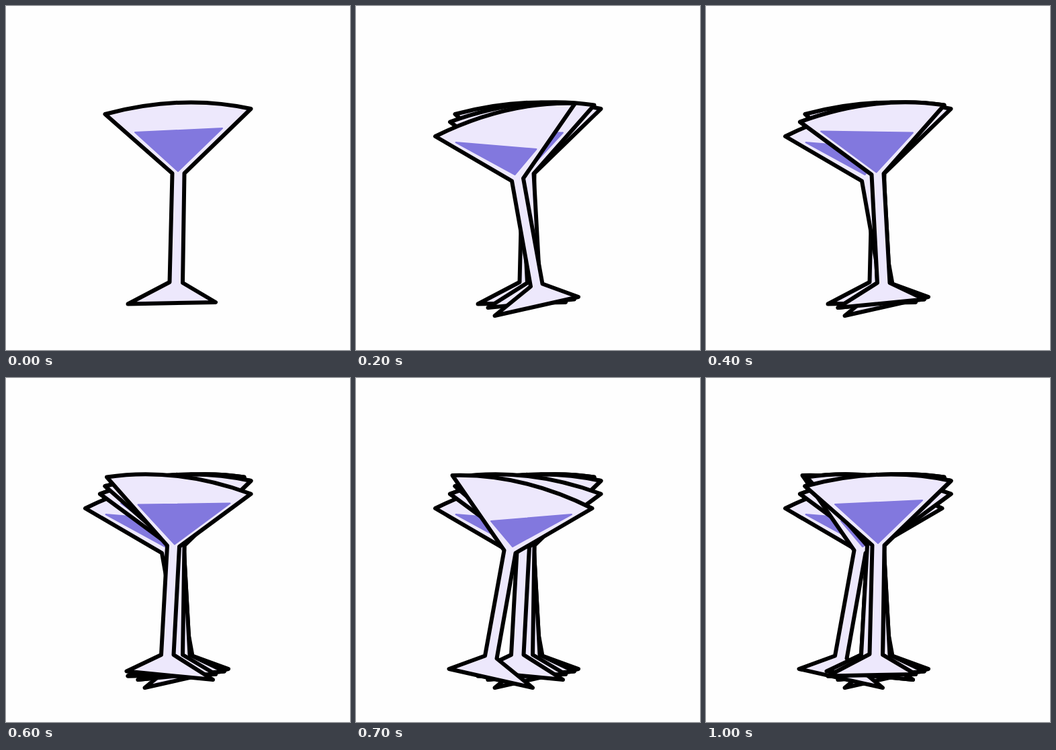
An HTML page for the animation above (1100 ms loop, 512x512 px).

```html
<!DOCTYPE html>
<html lang="en">
<head>
<meta charset="utf-8">
<title>Swaying glass</title>
<style>
  html, body { margin: 0; width: 100%; height: 100%; overflow: hidden; background: #fefefe; }
  svg { display: block; width: 100%; height: 100%; }
  .glass { fill: #ede8fc; stroke: #000; stroke-width: 6; stroke-linejoin: round; }
  .drink { fill: #8278de; stroke: #8278de; stroke-width: 2; stroke-linejoin: round; }
</style>
</head>
<body>
<svg id="stage" viewBox="0 0 512 512"></svg>
<script>
const LOOP = 1100;
const stage = document.getElementById('stage');

// Outline order: rim left, curve control, rim right, then clockwise to the left of the neck.
const upright = {
  glass: 'M147.5 161Q262 130.5 364.5 153L265.5 249L263 412L312 441L181.5 443.5L243.5 411L247.5 249Z',
  drink: 'M192 188L322 182L256 246Z'
};
const lean = {
  glass: 'M140 172.5Q251 132 354.5 147.5L264.5 249.5L273.5 412L325 436.5L196.5 449L255 412L246.5 251Z',
  drink: 'M171 186.5L308 188.5L253.5 247.5Z'
};
const tilt = {
  glass: 'M118 194Q223 142 326 145L249 256.5L277.5 413.5L331 433L206.5 461L260 417.5L232 260.5Z',
  drink: 'M148.5 203L268.5 213L236.5 251Z'
};
const mirror = (pose, sum) => ({ ...pose, flip: `matrix(-1 0 0 1 ${sum} 0)` });
const leanBack = mirror(lean, 504.5);
const tiltBack = mirror(tilt, 469.5);

// Each pose is stamped over the earlier ones and stays until the loop restarts.
const stamps = [
  [0, upright], [100, lean], [200, tilt], [400, lean], [500, upright],
  [600, leanBack], [700, tiltBack], [900, leanBack], [1000, upright]
];

function add(parent, tag, attrs) {
  const el = document.createElementNS('http://www.w3.org/2000/svg', tag);
  for (const key in attrs) el.setAttribute(key, attrs[key]);
  return parent.appendChild(el);
}

const layers = stamps.map(([start, pose]) => {
  const group = add(stage, 'g', pose.flip ? { transform: pose.flip } : {});
  add(group, 'path', { class: 'glass', d: pose.glass });
  add(group, 'path', { class: 'drink', d: pose.drink });
  return { start, group };
});

function draw(time) {
  const t = time % LOOP;
  for (const { start, group } of layers) {
    group.setAttribute('visibility', t >= start ? 'visible' : 'hidden');
  }
}

let origin;
function tick(now) {
  origin ??= now;
  draw(now - origin);
  requestAnimationFrame(tick);
}

draw(0);
requestAnimationFrame(tick);
</script>
</body>
</html>
```
